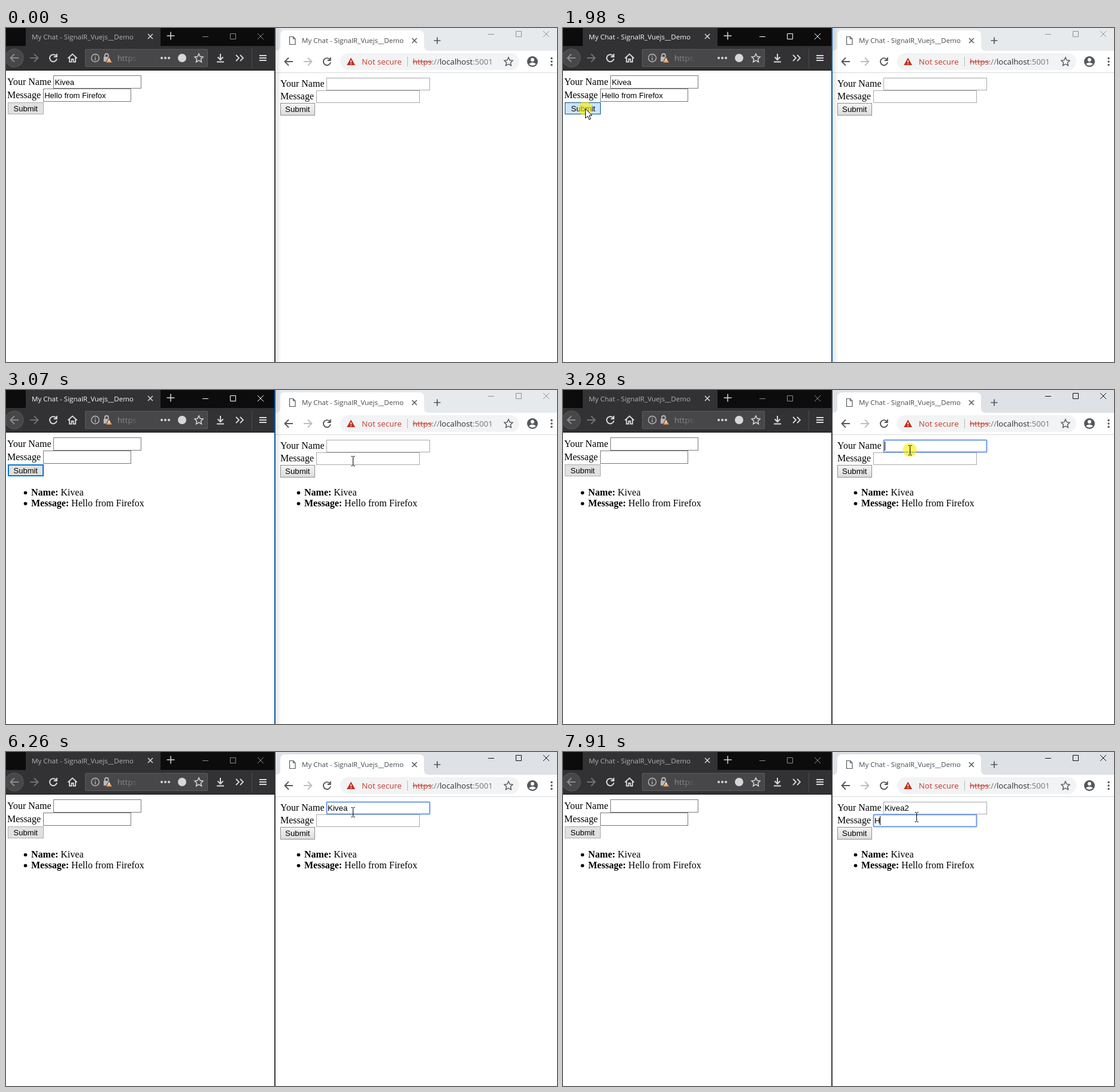
An HTML page with a canvas that plays this animation: 920x557 px, repeating every 8000 ms.

```html
<!DOCTYPE html>
<html lang="en">
<head>
<meta charset="utf-8">
<title>Chat demo in two browsers</title>
<style>
html, body { margin: 0; width: 100%; height: 100%; overflow: hidden; background: #fff; }
canvas { display: block; }
</style>
</head>
<body>
<canvas id="stage" width="920" height="557"></canvas>
<script>
const c = document.getElementById('stage').getContext('2d', { alpha: false });
const LOOP = 8000, NAME = 'Kivea', HELLO = 'Hello from Firefox';
const TITLE = 'My Chat - SignalR_Vuejs__Demo';
const UI = '"Open Sans", sans-serif', SANS = '"Liberation Sans", Arial, sans-serif';
const SERIF = '"Liberation Serif", "Times New Roman", serif';

// Event times in ms
const HOVER = 950, PRESS = 1980, SENT = 2060, LEAVE = 2360;
const NAME_CLICK = 3280, MSG_CLICK = 7200, CLICK_LEN = 80;
const NAME_KEYS = [4860, 5100, 5160, 5490, 5720, 6410], MSG_KEYS = [7910];
const CARET = [[NAME_CLICK, 3840], [4300, 6260], [6410, 6730], [MSG_CLICK, 7680], [7910, LOOP]];

// Pointer moves: start, end, steps, then a quadratic curve
const MOVES = [
  [70, 860, 11, 761, 525, 200, -30, 44, 144],
  [950, 951, 2, 43, 143, 43, 143, 43, 143],
  [1200, 1370, 3, 41, 140, 39, 137, 37, 134],
  [2360, 2910, 8, 80, 139, 286, 158, 578, 125],
  [3070, 3230, 3, 579, 118, 579, 108, 579, 100],
  [6730, 6731, 2, 585, 100, 585, 100, 585, 100],
  [6880, 7200, 5, 586, 101, 589, 104, 590, 108]
];
const INPUTS = [[79, 79, 147, 22], [62, 101, 147, 22], [535, 83, 173, 21], [518, 104, 173, 21]];

const within = (t, a, b) => t >= a && t < b;

function rect(x, y, w, h, fill) {
  c.fillStyle = fill;
  c.fillRect(x, y, w, h);
}
function frame(x, y, w, h, fill, line, width = 1) {
  rect(x, y, w, h, line);
  rect(x + width, y + width, w - 2 * width, h - 2 * width, fill);
}
function text(s, x, y, font, color) {
  c.font = font;
  c.fillStyle = color;
  c.fillText(s, x, y);
}
function disc(x, y, r, color) {
  c.fillStyle = color;
  c.beginPath();
  c.arc(x, y, r, 0, 7);
  c.fill();
}
function round(x, y, w, h, r, color) {
  c.fillStyle = color;
  c.beginPath();
  c.roundRect(x, y, w, h, r);
  c.fill();
}
// Icon path relative to its centre
function icon(x, y, d, line, width = 1, fill) {
  const p = new Path2D(d);
  c.save();
  c.translate(x, y);
  if (fill) { c.fillStyle = fill; c.fill(p); }
  if (line) { c.strokeStyle = line; c.lineWidth = width; c.stroke(p); }
  c.restore();
}

const CROSS = 'M-4 -4L4 4M4 -4L-4 4';
const PLUS = 'M-6.5 0H6.5M0 -6.5V6.5';
const BACK = 'M7 0H-6M0 -6.5L-6.5 0L0 6.5';
const NEXT = 'M-7 0H6M0 -6.5L6.5 0L0 6.5';
const RELOAD = 'M4.7 -3.6A6 6 0 1 0 5.9 1.2M5.8 -7V-2H0.8';
const STAR = 'M0 -7L2.1 -2.4L7 -1.8L3.4 1.7L4.4 6.7L0 4.2L-4.4 6.7L-3.4 1.7L-7 -1.8L-2.1 -2.4Z';

function windowButtons(x, y, color) {
  rect(x, y, 10, 1, color);
  icon(x + 51, y, 'M-4.5 -4.5H4.5V4.5H-4.5Z', color);
  icon(x + 97, y, 'M-5 -5L5 5M5 -5L-5 5', color);
}

function darkChrome(active) {
  const pale = '#d7d7db';
  rect(0, 0, 448, 71, '#0c0c0d');
  rect(33, 0, 225, 30, '#323234');
  rect(0, 30, 448, 40, '#323234');
  text(TITLE, 43, 19, '11.55px ' + UI, active ? '#f9f9fa' : '#b1b1b3');
  icon(241, 14, CROSS, pale, 1.5);
  icon(275, 13, PLUS, pale, 1.5);
  windowButtons(328, 14, active ? '#fff' : '#8c8c8c');

  disc(14, 50, 15.5, '#5a5a5c');
  disc(14, 50, 14.5, '#474749');
  icon(14, 50, BACK, '#8b8b8d', 2);
  icon(47, 50, NEXT, '#717173', 2);
  icon(79, 50, RELOAD, pale, 2);
  icon(111, 50, 'M-7.5 0.5L0 -6.5L7.5 0.5M-5 -1V6.5H-1.5V2H1.5V6.5H5V-1', pale, 1.8);

  round(132, 35, 205, 30, 2, '#5b5b5d');
  round(133, 36, 203, 28, 2, '#474749');
  icon(149, 50, 'M6.5 0A6.5 6.5 0 1 1 -6.5 0A6.5 6.5 0 1 1 6.5 0M0 -1V4M0 -4V-2.4', '#b9b9bc', 1.4);
  icon(168, 49, 'M-3 -1V-3A3 3 0 0 1 3 -3V-1', '#b9b9bc', 1.8);
  rect(163, 48, 10, 8, '#b9b9bc');
  icon(172, 53, 'M0 -5L5.5 5H-5.5Z', '#474749', 1, '#f2a35e');
  rect(171.5, 51, 1, 4, '#fff');
  const fade = c.createLinearGradient(186, 0, 222, 0);
  fade.addColorStop(0, '#929295');
  fade.addColorStop(.6, '#7c7c7f');
  fade.addColorStop(1, '#474749');
  text('https:', 186, 55, '13.2px ' + UI, fade);
  for (const x of [260, 266, 272]) disc(x, 50, 2, pale);
  disc(294, 50, 7, pale);
  icon(322, 50, STAR, pale, 1.5);
  icon(358, 50, 'M0 -7V3M-4.5 -1.5L0 3L4.5 -1.5M-6 6.5H6', pale, 2);
  icon(390, 50, 'M-6 -5L-1 0L-6 5M1 -5L6 0L1 5', pale, 1.8);
  rect(410, 34, 1, 33, '#4c4c4e');
  for (const y of [45, 49, 53]) rect(423, y, 12, 2, pale);
}

function lightChrome(active) {
  const ink = '#54585c';
  rect(450, 0, 470, 38, active ? '#dee1e6' : '#e7eaed');
  icon(450, 38, 'M0 0Q8 0 8 -8V-26Q8 -34 16 -34H240Q248 -34 248 -26V-8Q248 0 256 0Z', null, 0, '#fff');
  icon(478, 21, 'M-4.5 -6.5H1.5L5 -3V6.5H-4.5ZM1.5 -6.5V-3H5', ink, 1.2);
  text(TITLE, 494, 25, '11.55px ' + UI, '#45494d');
  icon(682, 21, CROSS, ink, 1.5);
  icon(720, 21, PLUS.replaceAll('6.5', '5.5'), ink, 1.7);
  windowButtons(805, 10, active ? '#111' : '#8e9092');

  icon(472, 56, BACK, ink, 1.9);
  icon(504, 56, NEXT, '#bcbec1', 1.9);
  icon(536, 56, RELOAD, ink, 1.9);
  round(558, 42, 299, 28, 14, '#f1f3f4');
  icon(576, 56, 'M0 -6.5L7 6H-7Z', null, 0, '#c5301f');
  rect(575.3, 54, 1.5, 3.5, '#fff');
  rect(575.3, 59, 1.5, 1.5, '#fff');
  const font = '13.2px ' + UI;
  text('Not secure', 594, 61, font, '#c53929');
  rect(670, 48, 1, 16, '#b4b6b9');
  text('https', 679, 61, font, '#c53929');
  const tail = 679 + c.measureText('https').width;
  rect(679, 56, tail - 678, 1, '#c53929');
  text('://', tail, 61, font, '#75797d');
  const host = tail + c.measureText('://').width;
  text('localhost', host, 61, font, '#2b2e31');
  text(':5001', host + c.measureText('localhost').width, 61, font, '#75797d');
  icon(839, 56, STAR, ink, 1.4);
  disc(879, 56, 9, ink);
  disc(879, 53, 3, '#fff');
  icon(879, 56, 'M-6 4Q0 -1 6 4Q0 9.5 -6 4Z', null, 0, '#fff');
  for (const y of [50.5, 56, 61.5]) disc(911, y, 1.7, ink);
  rect(450, 74, 470, 1, '#d8dadd');
}

function labels(x, y, step) {
  text('Your Name', x, y, '16px ' + SERIF, '#000');
  text('Message', x, y + step, '16px ' + SERIF, '#000');
}

function list(x) {
  [['Name:', NAME], ['Message:', HELLO]].forEach(([label, value], i) => {
    const y = 176 + 18 * i;
    disc(x - 9.5, y - 4.5, 2.8, '#000');
    text(label, x, y, 'bold 16px ' + SERIF, '#000');
    const w = c.measureText(label + ' ').width;
    text(value, x + w, y, '16px ' + SERIF, '#000');
  });
}

function leftPage(t, active) {
  const font = '13px ' + SANS;
  labels(2, 95, 22);
  for (const box of INPUTS.slice(0, 2)) frame(...box, '#fff', '#7a7a7a');
  if (t < SENT) {
    text(NAME, 81.5, 95, font, '#000');
    text(HELLO, 64.2, 117, font, '#000');
  }
  const pressed = within(t, PRESS, SENT), hover = within(t, HOVER, LEAVE);
  const fill = pressed ? '#cce4f7' : hover ? '#e5f1fb' : '#e1e1e1';
  const line = pressed ? '#005499' : hover || active ? '#0078d7' : '#adadad';
  frame(3, 124, 60, 20, fill, line, active && !pressed ? 2 : 1);
  text('Submit', pressed ? 13.5 : 12.5, 139, font, '#000');
}

function focusBox([x, y, w, h]) {
  c.strokeStyle = '#6b9ae8';
  c.lineWidth = 2;
  c.beginPath();
  c.roundRect(x + .5, y + .5, w - 1, h - 1, 1);
  c.stroke();
}

function rightPage(t) {
  const font = '13.33px ' + SANS;
  labels(458, 98, 21);
  const typed = (s, keys) => s.slice(0, keys.filter(k => t >= k).length);
  const fields = [typed(NAME + '2', NAME_KEYS), typed('H', MSG_KEYS)];
  const focus = t < NAME_CLICK ? -1 : t < MSG_CLICK ? 0 : 1;
  fields.forEach((s, i) => {
    const box = INPUTS[i + 2], [x, y] = box;
    frame(...box, '#fff', '#a9a9a9');
    text(s, x + 2, y + 15, font, '#000');
    if (i === focus && CARET.some(([a, b]) => within(t, a, b)))
      rect(Math.floor(x + 2 + c.measureText(s).width), y + 3, 1, 15, '#000');
  });
  if (focus >= 0) focusBox(INPUTS[focus + 2]);
  const shade = c.createLinearGradient(0, 126, 0, 145);
  shade.addColorStop(0, '#f4f4f4');
  shade.addColorStop(1, '#dcdcdc');
  frame(458, 125, 58, 21, shade, '#8f8f8f');
  text('Submit', 466, 140, font, '#000');
}

function pointerAt(t) {
  const m = MOVES.findLast(m => t >= m[0]);
  if (!m) return null;
  const [start, end, steps, x0, y0, cx, cy, x1, y1] = m;
  const k = Math.floor((t - start) / (end - start) * (steps - 1) + 1e-6);
  const u = Math.sin(Math.min(1, k / (steps - 1)) * Math.PI / 2), v = 1 - u;
  const curve = (a, b, d) => Math.round(v * v * a + 2 * u * v * b + u * u * d);
  return [curve(x0, cx, x1), curve(y0, cy, y1)];
}

function pointer(t) {
  const pos = pointerAt(t);
  if (!pos) return;
  const [x, y] = pos;
  if ([PRESS, NAME_CLICK, MSG_CLICK].some(a => within(t, a, a + CLICK_LEN)))
    disc(x, y, 11.5, 'rgba(250,238,0,.6)');
  if (INPUTS.some(([l, top, w, h]) => within(x, l, l + w) && within(y, top, top + h)))
    icon(x + .5, y + .5, 'M-3 -8H-1L0 -7L1 -8H3M0 -7V7M-3 8H-1L0 7L1 8H3', '#000');
  else
    icon(x + .5, y + .5, 'M0 0V16L3.7 12.5L6.2 18.2L8.6 17.2L6.2 11.5H11Z', '#000', 1, '#fff');
}

function draw(t) {
  const leftActive = within(t, PRESS, NAME_CLICK), rightActive = t >= NAME_CLICK;
  rect(0, 0, 920, 557, '#fff');
  darkChrome(leftActive);
  lightChrome(rightActive);
  if (!rightActive) {
    const shadow = c.createLinearGradient(450, 0, 460, 0);
    shadow.addColorStop(0, 'rgba(0,0,0,.1)');
    shadow.addColorStop(1, 'rgba(0,0,0,0)');
    rect(450, 0, 10, 557, shadow);
  }
  rect(448, 0, 2, 557, leftActive ? '#0a5ca8' : '#39393b');
  leftPage(t, leftActive);
  rightPage(t);
  if (t >= SENT) {
    list(42);
    list(498);
  }
  pointer(t);
}

const begin = performance.now();
function tick() {
  draw((performance.now() - begin) % LOOP);
  requestAnimationFrame(tick);
}
tick();
</script>
</body>
</html>
```
